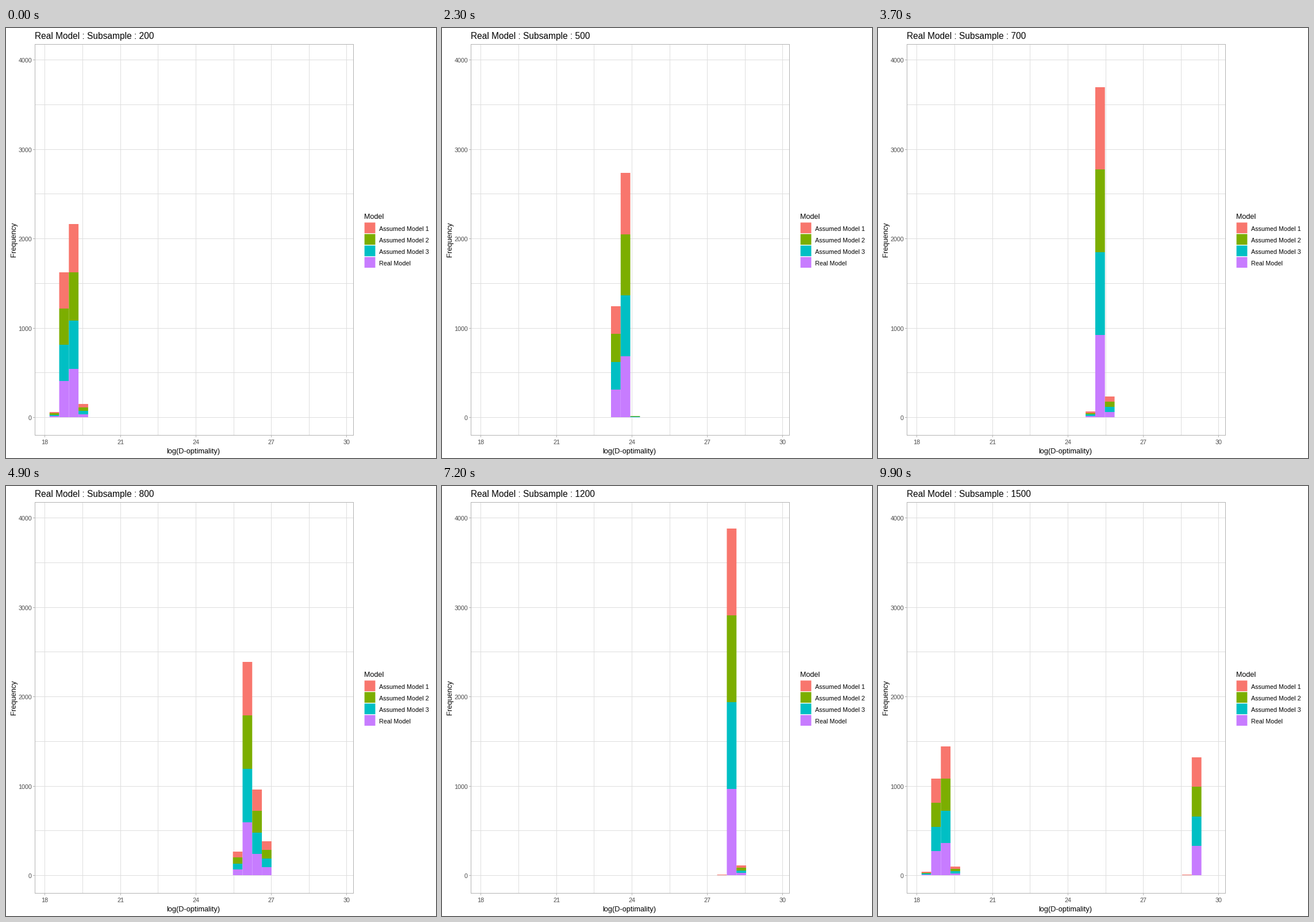
Recreate the animation shown at these times as a matplotlib script. Size 748 by 748 pixels, loop 10000 ms.

```python
import math

import matplotlib.pyplot as plt
import numpy as np
from matplotlib.animation import FuncAnimation
from matplotlib.patches import Rectangle

SIZE, DPI = 748, 100
RED, GREEN, TEAL, PURPLE = "#F8766D", "#7CAE00", "#00BFC4", "#C77CFF"
STACK = (PURPLE, TEAL, GREEN, RED)  # bottom to top
GRID, EDGE, TICK_TEXT = "#DEDEDE", "#B3B3B3", "#4D4D4D"
SAMPLES = range(200, 1600, 100)
BINS, RUNS = 30, 1000
EDGES = 18.18 + 0.3837 * np.arange(BINS + 1)


def histogram(n):
    """Expected count per bin for one model: a normal law that narrows with n."""
    growth = math.log(n / SAMPLES[0])
    mean = 18.986 + 5.05 * growth - 0.0016 * growth ** 5
    sd = 2.75 / math.sqrt(n)
    cdf = [0.5 + 0.5 * math.erf((e - mean) / (sd * math.sqrt(2))) for e in EDGES]
    return RUNS * np.diff(cdf)


COUNTS = [histogram(n) for n in SAMPLES]


def x_px(v):
    return 67.88 + 43.753 * (v - 18)


def y_px(count):
    return 677.45 - 0.1554 * count


fig = plt.figure(figsize=(SIZE / DPI, SIZE / DPI), dpi=DPI, facecolor="white")
ax = fig.add_axes([0, 0, 1, 1])
ax.set_xlim(0, SIZE)
ax.set_ylim(SIZE, 0)
ax.axis("off")


def box(x0, y0, x1, y1, color, z=1):
    return ax.add_patch(Rectangle((x0, y0), x1 - x0, y1 - y0, facecolor=color,
                                  linewidth=0, snap=False, zorder=z))


def label(x, y, text, px, color="black", ha="left", **kw):
    return ax.text(x, y, text, fontsize=px * 72 / DPI, color=color, ha=ha,
                   va="baseline", family="Liberation Sans", **kw)


def draw_panel():
    for i in range(9):
        value, count = 18 + 1.5 * i, 500 * i
        x, y = int(x_px(value)), int(y_px(count))
        box(x, 29, x + 1, 708, GRID)
        box(51, y, 604, y + 1, GRID)
        if i % 2 == 0:
            box(x, 709, x + 1, 712, EDGE)
            box(47, y, 50, y + 1, EDGE)
            label(x + 0.5, 724, f"{value:.0f}", 10.8, TICK_TEXT, "center")
            label(45, y + 5, str(count), 10.8, TICK_TEXT, "right")
    for x in (50, 604):
        box(x, 28, x + 1, 709, EDGE, 5)
    for y in (28, 708):
        box(50, y, 605, y + 1, EDGE, 5)
    label(326, 740, "log(D-optimality)", 12.7, ha="center")
    label(17, 368, "Frequency", 12.7, ha="center", rotation=90,
          rotation_mode="anchor")


def draw_legend():
    label(623, 332, "Model", 12.6)
    names = ("Assumed Model 1", "Assumed Model 2", "Assumed Model 3", "Real Model")
    for i, (name, color) in enumerate(zip(names, STACK[::-1])):
        y = 338.4 + 20 * i
        box(623.6, y, 642.4, y + 18.6, color)
        label(649, y + 14.6, name, 10.75)


draw_panel()
draw_legend()
title = label(50, 19, "", 15.55)
bars = [[box(x_px(a), 677, x_px(b), 677, color, 3) for color in STACK]
        for a, b in zip(EDGES, EDGES[1:])]


def pose(frame):
    """State index and progress towards the next state."""
    for i in range(len(SAMPLES)):
        start = 4 + 7 * i + min(i, 3)
        steps = 4 if i < 3 else 3
        if frame < start + steps - 1:
            return i, max(0, frame - start + 1) / steps


def update(frame):
    state, t = pose(frame)
    now, after = COUNTS[state], COUNTS[(state + 1) % len(COUNTS)]
    for column, count in zip(bars, now + (after - now) * t):
        for k, rect in enumerate(column):
            bottom, top = round(y_px(k * count)), round(y_px((k + 1) * count))
            rect.set_y(top)
            rect.set_height(bottom - top)
            rect.set_visible(top < bottom)
    title.set_text(f"Real Model : Subsample : {SAMPLES[state]}")
    return [title]


anim = FuncAnimation(fig, update, frames=100, interval=100, repeat=True,
                     repeat_delay=0, blit=False)
plt.show()
```
